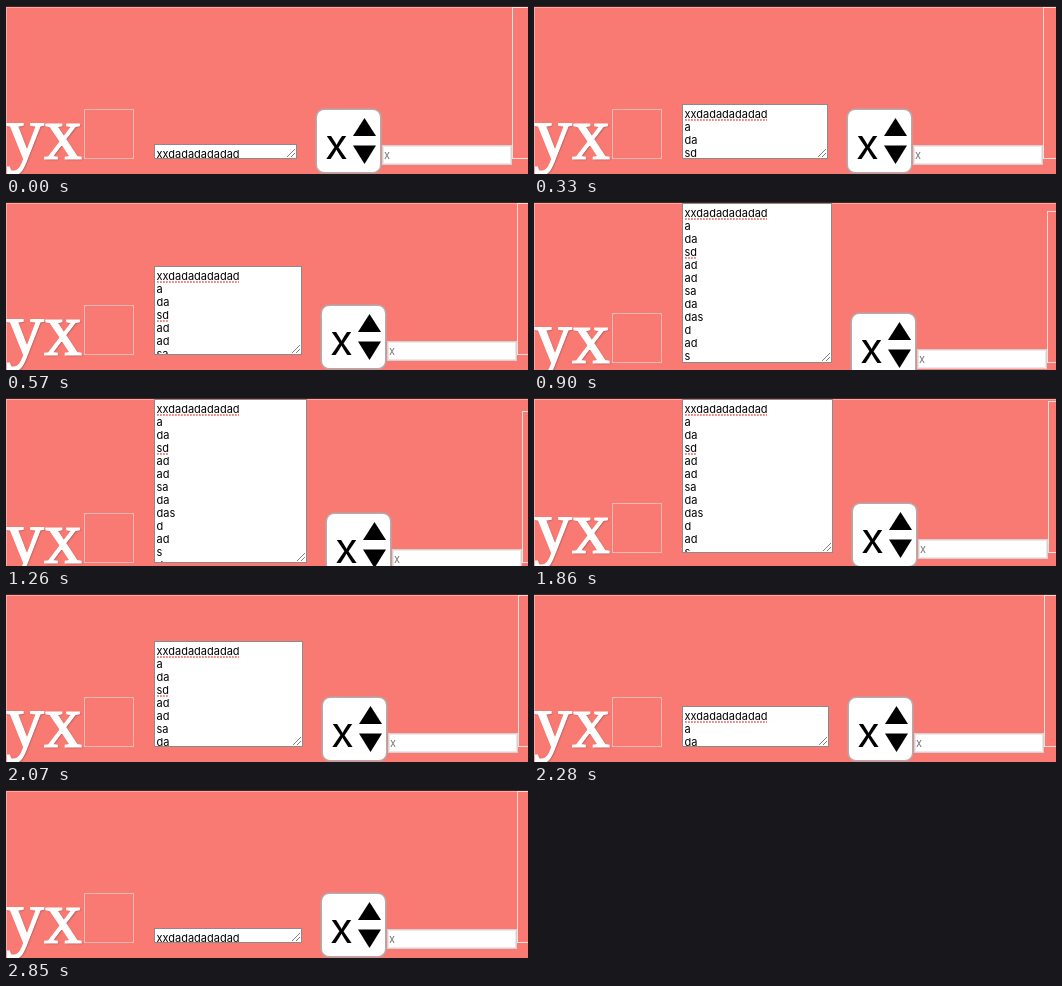
An HTML page with a canvas for the animation above (2880 ms loop, 522x168 px).

```html
<!DOCTYPE html>
<html lang="en">
<head>
<meta charset="utf-8">
<title>Resizing a text area</title>
<style>
html, body { margin: 0; width: 522px; height: 168px; overflow: hidden; background: #f87a73; }
canvas { display: block; }
</style>
</head>
<body>
<canvas id="stage" width="522" height="168"></canvas>
<script>
const ctx = document.getElementById('stage').getContext('2d');
const LOOP = 2880, STEP = 30, BASE = 153, LEFT = 148;
const SANS = 'Inter, "Liberation Sans", sans-serif';
const SERIF = '"Liberation Serif", "Noto Serif", serif';
const LINES = ['xxdadadadadad', 'a', 'da', 'sd', 'ad', 'ad', 'sa', 'da', 'das', 'd', 'ad', 's', 'da'];
const MISSPELT = [0, 3];

// [time, value] points of the drag
const HEIGHT = [[0, 15], [570, 89], [900, 160], [1260, 164], [1860, 154], [2280, 41], [2460, 15], [2880, 15]];
const RIGHT = [[0, 291], [570, 296], [900, 298], [1260, 301], [1860, 299], [2280, 295], [2700, 296], [2880, 296]];

// Monotone cubic interpolation
function track(pts, t) {
  const slope = i => (pts[i + 1][1] - pts[i][1]) / (pts[i + 1][0] - pts[i][0]);
  const tangent = i => {
    if (i === 0) return slope(0);
    if (i === pts.length - 1) return slope(i - 1);
    const a = slope(i - 1), b = slope(i);
    return a * b <= 0 ? 0 : 2 * a * b / (a + b);
  };
  let i = 0;
  while (i < pts.length - 2 && t >= pts[i + 1][0]) i++;
  const w = pts[i + 1][0] - pts[i][0], u = (t - pts[i][0]) / w;
  const u2 = u * u, u3 = u2 * u;
  return (2 * u3 - 3 * u2 + 1) * pts[i][1] + (u3 - 2 * u2 + u) * w * tangent(i) +
    (3 * u2 - 2 * u3) * pts[i + 1][1] + (u3 - u2) * w * tangent(i + 1);
}

function rect(x, y, w, h, color) {
  ctx.fillStyle = color;
  ctx.fillRect(x, y, w, h);
}

function frame(x, y, w, h, color) {
  ctx.strokeStyle = color;
  ctx.lineWidth = 1;
  ctx.strokeRect(x + .5, y + .5, w - 1, h - 1);
}

function label(text, x, y, font, color) {
  ctx.font = font;
  ctx.fillStyle = color;
  ctx.fillText(text, x, y);
}

function line(x1, y1, x2, y2) {
  ctx.beginPath();
  ctx.moveTo(x1, y1);
  ctx.lineTo(x2, y2);
  ctx.stroke();
}

function triangle(x, base, tip) {
  ctx.beginPath();
  ctx.moveTo(x - 11.5, base);
  ctx.lineTo(x + 11.5, base);
  ctx.lineTo(x, tip);
  ctx.fill();
}

function heading(y) {
  const font = '76px ' + SERIF;
  ctx.save();
  ctx.shadowColor = 'rgba(90, 60, 60, .5)';
  ctx.shadowOffsetX = ctx.shadowOffsetY = 1;
  ctx.shadowBlur = 1.5;
  label('yx', 0, y, font, '#fff');
  ctx.restore();
  ctx.strokeStyle = '#fff';
  ctx.lineWidth = 1.2;
  ctx.font = font;
  ctx.strokeText('yx', 0, y);
}

function textArea(right, bottom, h) {
  const top = bottom - h, w = right - LEFT;
  rect(LEFT, top, w, h, '#fff');
  ctx.save();
  ctx.beginPath();
  ctx.rect(LEFT + 1, top + 1, w - 2, h - 2);
  ctx.clip();
  LINES.forEach((text, i) => {
    const y = top + 14 + i * 13;
    label(text, LEFT + 2.5, y, '11px ' + SANS, '#000');
    if (!MISSPELT.includes(i)) return;
    ctx.strokeStyle = '#f0605a';
    ctx.lineWidth = 1.7;
    ctx.setLineDash([1.8, 1.2]);
    line(LEFT + 3, y + 2, LEFT + 2 + ctx.measureText(text).width, y + 2);
    ctx.setLineDash([]);
  });
  ctx.strokeStyle = '#808080';
  ctx.lineWidth = 1;
  line(right - 10, bottom - 2, right - 2, bottom - 10);
  line(right - 6, bottom - 2, right - 2, bottom - 6);
  ctx.restore();
  frame(LEFT, top, w, h, '#8f8a8a');
}

function picker(x, y) {
  ctx.beginPath();
  ctx.roundRect(x + .25, y - 49.75, 64.5, 63.5, 8);
  ctx.fillStyle = '#fff';
  ctx.fill();
  ctx.strokeStyle = '#b3abab';
  ctx.lineWidth = 1.5;
  ctx.stroke();
  label('x', x + 9, y - .5, '42px ' + SANS, '#000');
  triangle(x + 48.5, y - 23, y - 41);
  triangle(x + 48.5, y - 13.5, y + 5);
}

function input(x, y) {
  rect(x, y - 14, 130, 20, '#fff');
  frame(x, y - 14, 130, 20, '#d8cfce');
  frame(x + 1, y - 13, 128, 18, '#ece8e8');
  label('x', x + 2, y, '11px ' + SANS, '#777');
}

function draw(now) {
  const t = Math.floor(now % LOOP / STEP) * STEP;
  const h = Math.round(track(HEIGHT, t));
  const right = Math.round(track(RIGHT, t));
  const y = Math.max(BASE, h + 1);
  const x = right + 19;

  rect(0, 0, 522, 168, '#f87a73');
  frame(0, 1, 540, 190, '#fba9a4');
  heading(y);
  frame(78, y - 50, 50, 50, '#f0b9b5');
  textArea(right, y, h);
  picker(x, y);
  input(x + 66, y);
  frame(x + 196, y - 152, 152, 152, '#f9dedc');
  rect(0, 0, 522, 1, '#4a2422');
}

const start = performance.now();
function tick() {
  draw(performance.now() - start);
  requestAnimationFrame(tick);
}
tick();
</script>
</body>
</html>
```
